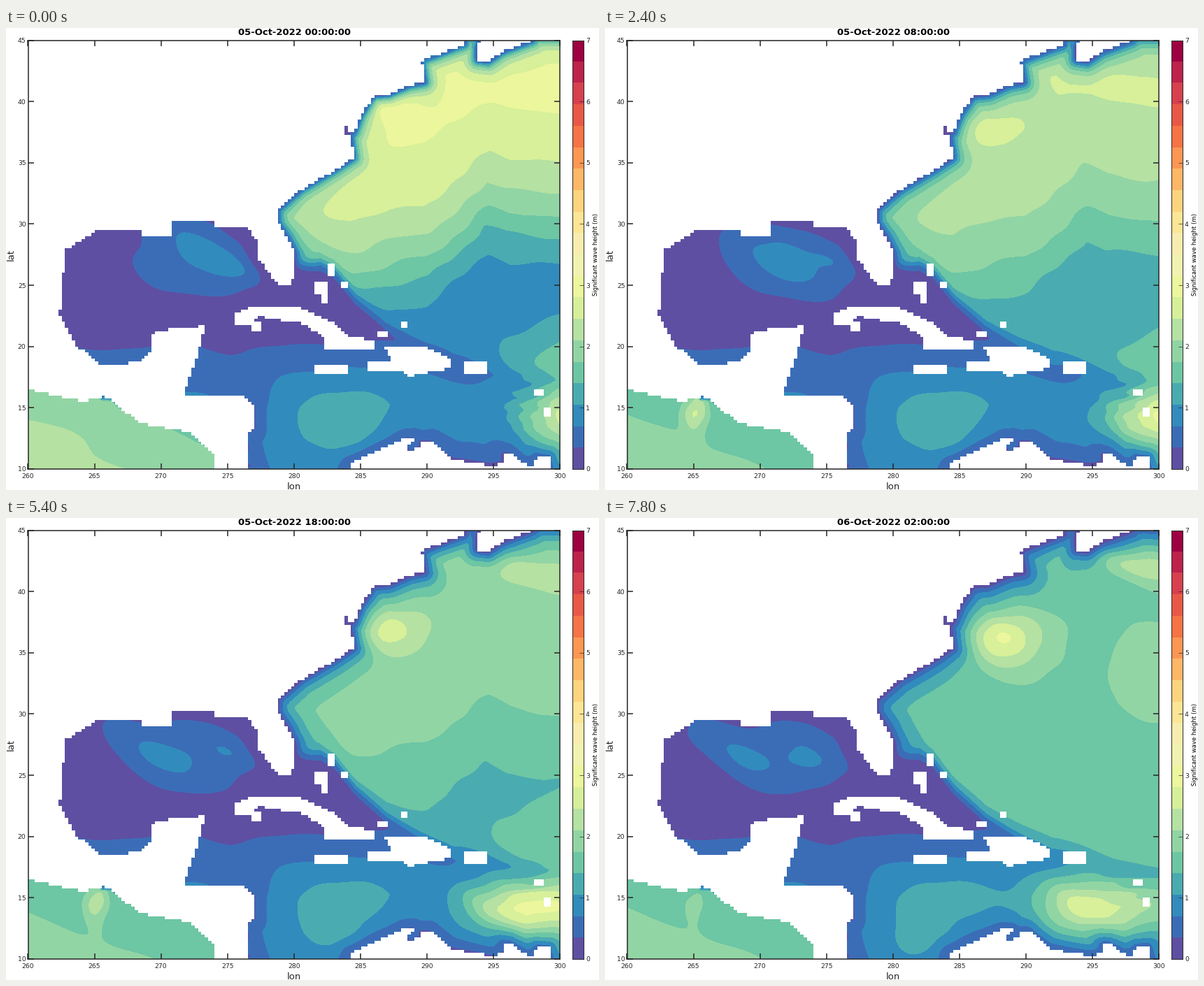
A matplotlib script that plays this animation: 848x661 px, repeating every 8 s.

```python
import numpy as np
import matplotlib.pyplot as plt
from matplotlib.animation import FuncAnimation
from matplotlib.colors import ListedColormap, to_rgb
from matplotlib.path import Path

W, H = 848, 661
LEFT, RIGHT, TOP, BOTTOM = 31.5, 792, 17.5, 631
INK = "#262626"
HOURS = [0, 10, 18, 26]
STEPS = 14

plt.rcParams["font.family"] = "DejaVu Sans"

# Key points of the coasts, in stage pixels
MAINLAND = [
    (657, 0), (656, 24), (594, 47), (599, 78), (578, 82), (549, 95), (526, 97),
    (507, 126), (498, 150), (488, 150), (488, 140), (483, 140), (483, 154),
    (493, 155), (497, 186), (469, 204), (422, 231), (388, 260), (388, 279),
    (402, 300), (412, 322), (412, 354), (407, 368), (388, 368), (360, 330),
    (357, 302), (341, 283), (298, 283), (298, 276), (236, 276), (236, 297),
    (193, 297), (193, 289), (131, 289), (85, 317), (80, 364), (76, 412),
    (100, 454), (136, 483), (193, 478), (207, 462), (210, 434), (284, 426),
    (272, 470), (253, 525), (335, 525), (355, 541), (355, 573), (345, 578),
    (345, 604), (354, 700), (298, 700), (298, 610), (264, 579), (193, 566),
    (141, 527), (108, 534), (32, 517), (0, 517), (0, 0)]
SOUTH = [
    (492, 700), (492, 622), (535, 602), (568, 587), (583, 587), (569, 606),
    (592, 600), (592, 591), (606, 591), (635, 617), (692, 626), (711, 622),
    (711, 609), (720, 609), (750, 629), (760, 613), (777, 613), (777, 700)]
NORTH_EAST = [(683, 0), (674, 26), (674, 46), (690, 48), (710, 34), (754, 18), (754, 0)]
CUBA = [
    (327, 410), (350, 399), (415, 399), (470, 423), (488, 440), (526, 448), (526, 459),
    (455, 459), (455, 445), (427, 424), (360, 413), (350, 425), (327, 425)]
HISPANIOLA = [
    (540, 455), (597, 455), (635, 474), (635, 487), (573, 499), (568, 490),
    (516, 490), (516, 477), (550, 477)]
ISLETS = [
    (441, 481, 488, 495), (654, 477, 687, 495), (441, 364, 460, 380), (450, 380, 460, 394),
    (350, 420, 364, 434), (459, 337, 469, 355), (478, 364, 487, 373),
    (531, 433, 545, 442), (563, 421, 573, 429), (754, 516, 768, 526), (768, 543, 777, 556)]


def box(x0, y0, x1, y1):
    return [(x0, y0), (x1, y0), (x1, y1), (x0, y1)]


def closed(points):
    return Path(points + points[:1])


def land_mask():
    cx = LEFT + (np.arange(160) + 0.5) * (RIGHT - LEFT) / 160
    cy = TOP + (np.arange(140) + 0.5) * (BOTTOM - TOP) / 140
    cells = np.array(np.meshgrid(cx, cy)).reshape(2, -1).T
    land = np.zeros(len(cells), bool)
    for shape in [MAINLAND, SOUTH, NORTH_EAST, CUBA, HISPANIOLA] + [box(*b) for b in ISLETS]:
        land |= closed(shape).contains_points(cells)
    rgba = np.ones((140, 160, 4))
    rgba[..., 3] = land.reshape(140, 160)
    return rgba


def coast_distance():
    dist2 = np.full(GX.shape, 1e6)
    for shape in (MAINLAND, SOUTH, NORTH_EAST):
        for x, y in closed(shape).interpolated(12).vertices:
            dist2 = np.minimum(dist2, (GX - x) ** 2 + (GY - y) ** 2)
    return np.sqrt(dist2)


def wobble(rng, size):
    """Smooth seeded noise that roughens the contours."""
    total = 0
    for _ in range(6):
        kx, ky = rng.normal(0, 0.045, 2)
        total = total + np.sin(kx * GX + ky * GY + rng.uniform(0, 2 * np.pi))
    return size * total / 2


def step_up(v, width):
    return 1 / (1 + np.exp(-np.clip(v / width, -50, 50)))


def bump(x, y, sx, sy, tilt=0):
    """Gaussian hill whose long axis dips by tilt degrees."""
    c, s = np.cos(np.radians(tilt)), np.sin(np.radians(tilt))
    u, v = X - x, Y - y
    return np.exp(-((c * u + s * v) / sx) ** 2 / 2 - ((c * v - s * u) / sy) ** 2 / 2)


GX, GY = np.meshgrid(np.linspace(LEFT, RIGHT, 161), np.linspace(TOP, BOTTOM, 141))
rng = np.random.default_rng(4)
X, Y = GX + wobble(rng, 4), GY + wobble(rng, 4)
COAST = coast_distance()

# Lines that part the seas, and the axis about which the Atlantic swell levels out
AXIS = np.interp(X, [430, 500, 600, 690, 720, 792], [345, 355, 330, 255, 268, 272])
ATLANTIC_EDGE = np.interp(GX, [340, 385, 412, 450, 470, 500, 545, 640, 792],
                          [200, 330, 345, 335, 345, 385, 425, 478, 500])
IN_ATLANTIC = step_up(ATLANTIC_EDGE - Y, 6)
IN_PACIFIC = (GX < 320) & (GY > 500 + 0.29 * (GX - LEFT))


def atlantic(at):
    q = Y - AXIS
    north, south = at(3.4, 1.7, 0.8, 0.2), at(3, 1.6, 1.2, 0.5)
    sea = at(5, 5, 4.95, 4.65) + np.where(
        q < 0, north * np.tanh(-q / 120), -south * np.tanh(q / 80))
    sea += at(2.6, 1.2, 0.9, 0.6) * bump(800, 480, 65, 45)
    sea += at(0, 0.2, 0.3, 0.7) * bump(790, 240, 50, 60)
    sea += at(0.5, 0.9, 1.6, 2.4) * bump(at(700, 710, 725, 750), at(90, 80, 75, 64), 75, 16, 8)
    sea += at(1.6, 0.9, 2.4, 3.6) * bump(at(545, 535, 535, 563), at(104, 150, 158, 172),
                                         at(25, 34, 38, 42), at(14, 18, 24, 27))
    shore = np.minimum(COAST, np.maximum(GY - 12, 1))
    return sea * (1 - np.exp(-shore / at(11, 14, 18, 21)))


def gulf_and_caribbean(at, hour):
    sea = np.interp(Y, [430, 460, 500, 540], [0.5, 1, 1.7, 2.1])
    sea += bump(270, 335, 72, 36)
    sea += 1.1 * bump(at(275, 235, 215, 190), at(312, 330, 335, 337), 55, 20, 28)
    sea += 0.8 * bump(at(320, 330, 320, 292), at(338, 328, 332, 342), 26, 12, 20)
    sea += 1.3 * bump(490, 555, 95, 50)
    sea += 0.8 * bump(at(502, 500, 482, 462), at(588, 595, 590, 598), 24, 20)
    sea += at(5.6, 6.3, 5, 2.6) * bump(800, 560, 45, 45)
    sea += 0.4 * np.sin(GY / 2.9 + GX / 25) * bump(745, 520, 22, 28)
    storm = np.interp(hour, [4, 10, 14, 18, 26], [0, 2, 4.2, 5, 5.6])
    sea += storm * bump(np.interp(hour, [8, 14, 18, 26], [738, 735, 718, 693]), 561,
                        at(34, 34, 43, 54), at(25, 25, 30, 36))
    return sea * (1 - 0.7 * step_up(GX - 320, 10) * np.exp(-COAST / 18))


def pacific(at, hour):
    sea = 5 + 0.012 * (Y - 568) - 0.005 * (X - LEFT) + at(0.9, 0, 0.05, 0.15)
    sea += at(0.4, 0, 0, 0) * bump(60, 580, 50, 18)
    plume = np.interp(hour, [0, 6, 10, 18, 26], [0.5, 2.4, 2.8, 2.2, 0.8])
    return sea + plume * bump(127, 548, 10, 20)


def waves(hour):
    """Wave height in colour bands."""
    def at(*values):
        return np.interp(hour, HOURS, values)

    sea = IN_ATLANTIC * atlantic(at) + (1 - IN_ATLANTIC) * gulf_and_caribbean(at, hour)
    return np.clip(np.where(IN_PACIFIC, pacific(at, hour), sea), 0.02, 19.9)


def smooth_palette(names, n):
    """Cubic blend through the named colours."""
    p = np.array([to_rgb(name) for name in names])
    m = np.gradient(p, axis=0, edge_order=2)
    t = np.linspace(0, len(p) - 1, n)
    k = np.minimum(t.astype(int), len(p) - 2)
    u = (t - k)[:, None]
    v = 1 - u
    rgb = (v * v * (1 + 2 * u) * p[k] + u * v * v * m[k]
           + u * u * (3 - 2 * u) * p[k + 1] - u * u * v * m[k + 1])
    return np.clip(rgb, 0, 1)


def label(x, y, text, size, **kw):
    kw = {"ha": "center", "va": "baseline", "color": INK, **kw}
    return fig.text(x / W, 1 - y / H, text, fontsize=size * 0.72, **kw)


def add_axes(x0, x1, line):
    ax = fig.add_axes([x0 / W, 1 - BOTTOM / H, (x1 - x0) / W, (BOTTOM - TOP) / H])
    for side in ax.spines.values():
        side.set(color=INK, zorder=5, linewidth=line)
    return ax


colors = smooth_palette(
    ["#5e4fa2", "#3288bd", "#66c2a5", "#abdda4", "#e6f598", "#f5f0b4",
     "#fee08b", "#fdae61", "#f46d43", "#d53e4f", "#9e0142"], 20)

fig = plt.figure(figsize=(8.48, 6.61), dpi=100, facecolor="white")
ax = add_axes(LEFT, RIGHT, 1.1)
layers = []
for step in range(STEPS):
    layer = ax.contourf(GX, GY, waves(2 * step), levels=np.arange(21), colors=colors, zorder=1)
    layer.set_visible(False)
    layers.append(layer)
ax.imshow(land_mask(), extent=(LEFT, RIGHT, BOTTOM, TOP), aspect="auto",
          interpolation="nearest", zorder=2)
ax.set(xlim=(LEFT, RIGHT), ylim=(BOTTOM, TOP), axisbelow=False)

lons, lats = np.arange(260, 301, 5), np.arange(10, 46, 5)
lon_px = np.linspace(LEFT, RIGHT, len(lons))
lat_px = np.linspace(BOTTOM, TOP, len(lats))
ax.set_xticks(lon_px, [""] * len(lons))
ax.set_yticks(lat_px, [""] * len(lats))
ax.tick_params(direction="in", length=8 * 0.72, width=1.1, color=INK, top=True, right=True)
for x, lon in zip(lon_px, lons):
    label(x, 643.5, str(lon), 9.3)
for y, lat in zip(lat_px, lats):
    label(28.5, y + 3.5, str(lat), 9.3, ha="right")

bar = add_axes(810, 826, 0.7)
bar.imshow(np.arange(20)[:, None], cmap=ListedColormap(colors), extent=(0, 1, 0, 7),
           origin="lower", aspect="auto", interpolation="nearest")
bar.set_xticks([])
bar.set_yticks(range(8), [""] * 8)
bar.tick_params(direction="in", left=False, right=True, length=4, width=0.5, color=INK)
for v, y in enumerate(np.linspace(BOTTOM, TOP, 8)):
    label(829, y + 3.5, str(v), 9.3, ha="left")

label(412, 660, "lon", 13.1)
label(10.5, 324.5, "lat", 13.1, rotation=90, rotation_mode="anchor")
label(846, 324, "Significant wave height (m)", 8.5, rotation=90, rotation_mode="anchor",
      color="black")
title = label(412.5, 10.5, "", 13.1, weight="bold", color="black")


def draw(frame):
    step = frame // 3
    for k, layer in enumerate(layers):
        layer.set_visible(k == step)
    day, hour = divmod(2 * step, 24)
    title.set_text(f"{5 + day:02d}-Oct-2022 {hour:02d}:00:00")
    return [title, *layers]


anim = FuncAnimation(fig, draw, frames=40, interval=200, repeat=True, repeat_delay=0)
plt.show()
```
